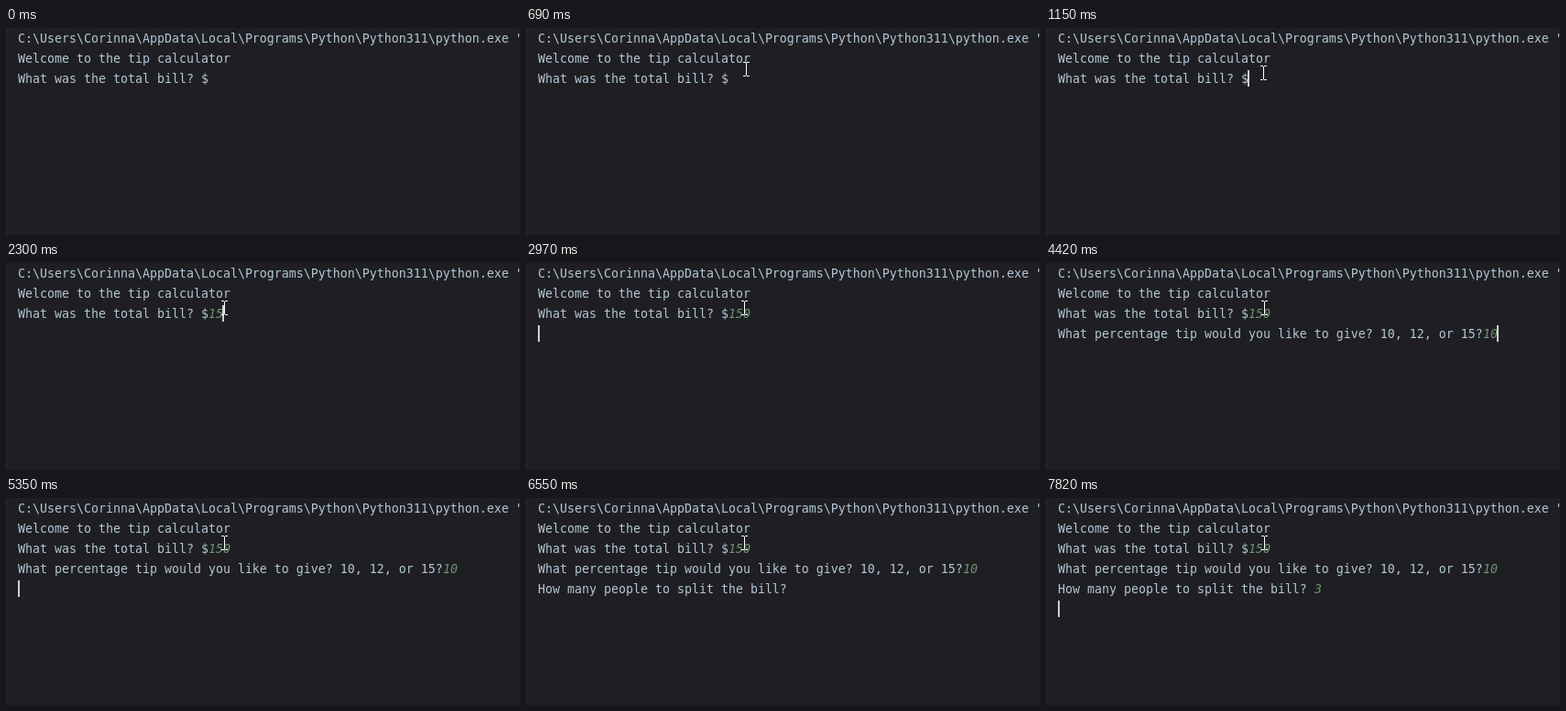
An HTML page for the animation above (8 s loop, 561 by 226 pixels).

```html
<!DOCTYPE html>
<html lang="en">
<head>
<meta charset="utf-8">
<title>Tip calculator console</title>
<style>
  html, body { margin: 0; width: 100%; height: 100%; overflow: hidden; background: #1f1f23; }
  svg { display: block; width: 561px; height: 226px; }
  text { font: 13.29px "DejaVu Sans Mono", "Noto Sans Mono", monospace; fill: #b2c6d5; white-space: pre; }
  .input { font-style: oblique; fill: #6a9470; }

  /* Percentages are ms / 80 of the 8 s loop. */
  .step { animation: 8s step-end infinite; }
  #bill1 { animation-name: at2030; }
  #bill2 { animation-name: at2300; }
  #bill3 { animation-name: at2570; }
  #askTip { animation-name: at3230; }
  #tip1 { animation-name: at4030; }
  #tip2 { animation-name: at4420; }
  #askPeople { animation-name: at5560; }
  #people { animation-name: at7020; }
  #caret { animation-name: caret; }
  #pointer { animation-name: pointer; }

  @keyframes at2030 { 0% { opacity: 0 } 25.375%, 100% { opacity: 1 } }
  @keyframes at2300 { 0% { opacity: 0 } 28.75%, 100% { opacity: 1 } }
  @keyframes at2570 { 0% { opacity: 0 } 32.125%, 100% { opacity: 1 } }
  @keyframes at3230 { 0% { opacity: 0 } 40.375%, 100% { opacity: 1 } }
  @keyframes at4030 { 0% { opacity: 0 } 50.375%, 100% { opacity: 1 } }
  @keyframes at4420 { 0% { opacity: 0 } 55.25%, 100% { opacity: 1 } }
  @keyframes at5560 { 0% { opacity: 0 } 69.5%, 100% { opacity: 1 } }
  @keyframes at7020 { 0% { opacity: 0 } 87.75%, 100% { opacity: 1 } }

  @keyframes caret {
    0% { opacity: 0; transform: translate(220px, 46px) }
    14.375% { opacity: 1; transform: translate(220px, 46px) }
    25.375% { opacity: 0; transform: translate(228px, 46px) }
    26.25% { opacity: 1; transform: translate(228px, 46px) }
    28.75% { opacity: 1; transform: translate(236px, 46px) }
    32.125% { opacity: 1; transform: translate(244px, 46px) }
    37.125% { opacity: 1; transform: translate(13px, 68px) }
    40.375% { opacity: 1; transform: translate(476px, 68px) }
    50.375% { opacity: 0; transform: translate(484px, 68px) }
    51.125% { opacity: 1; transform: translate(484px, 68px) }
    55.25% { opacity: 1; transform: translate(492px, 68px) }
    62.75% { opacity: 0; transform: translate(492px, 68px) }
    66.875% { opacity: 1; transform: translate(13px, 90px) }
    69.5% { opacity: 1; transform: translate(292px, 90px) }
    81.875% { opacity: 0; transform: translate(292px, 90px) }
    88.625% { opacity: 1; transform: translate(300px, 90px) }
    97.75%, 100% { opacity: 1; transform: translate(13px, 112px) }
  }

  @keyframes pointer {
    0% { opacity: 0; transform: translate(414px, 174px) }
    1.625% { opacity: 1; transform: translate(414px, 174px) }
    2.5% { transform: translate(396px, 158px) }
    3.375% { transform: translate(370px, 134px) }
    4.125% { transform: translate(340px, 108px) }
    5% { transform: translate(308px, 89px) }
    5.875% { transform: translate(281px, 78px) }
    6.75% { transform: translate(262px, 60px) }
    7.75% { transform: translate(249px, 50px) }
    8.625% { transform: translate(240px, 45px) }
    9.5% { transform: translate(239px, 45px) }
    10.25% { transform: translate(238px, 46px) }
    11.125% { transform: translate(237px, 46px) }
    12.75% { transform: translate(241px, 44px) }
    14.375% { transform: translate(237px, 49px) }
    16.875%, 100% { opacity: 1; transform: translate(238px, 49px) }
  }
</style>
</head>
<body>
<svg viewBox="0 0 561 226">
  <rect width="561" height="226" fill="#1f1f23"/>
  <rect width="1" height="226" fill="#2b2b2f"/>

  <text x="13" y="16">C:\Users\Corinna\AppData\Local\Programs\Python\Python311\python.exe "</text>
  <text x="13" y="38">Welcome to the tip calculator</text>
  <text x="13" y="60">What was the total bill? $</text>
  <text id="bill1" class="input step" x="221" y="60">1</text>
  <text id="bill2" class="input step" x="229" y="60">5</text>
  <text id="bill3" class="input step" x="237" y="60">0</text>

  <text id="askTip" class="step" x="13" y="82">What percentage tip would you like to give? 10, 12, or 15?</text>
  <text id="tip1" class="input step" x="477" y="82">1</text>
  <text id="tip2" class="input step" x="485" y="82">0</text>

  <text id="askPeople" class="step" x="13" y="104">How many people to split the bill?</text>
  <text id="people" class="input step" x="293" y="104">3</text>

  <rect id="caret" class="step" width="2" height="18" fill="#ced0d6"/>
  <path id="pointer" class="step" fill="none" stroke="#fff" shape-rendering="crispEdges"
        d="M-3 -7.5H0M1 -7.5H4M.5 -7V7M-3 7.5H0M1 7.5H4"/>
</svg>
</body>
</html>
```
